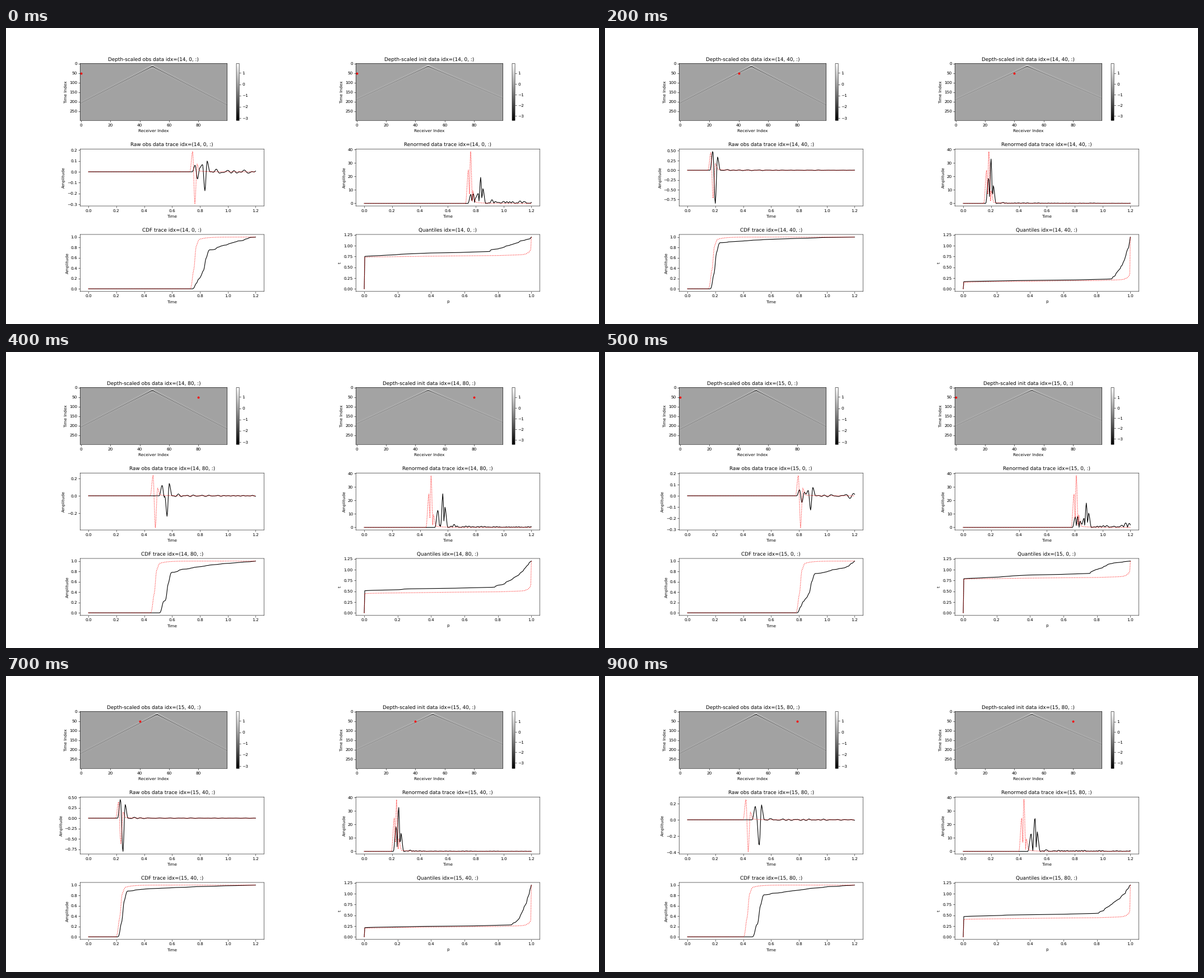
Recreate the animation shown at these times as a matplotlib script. Size 1058 by 529 pixels, loop 1 s.

```python
import numpy as np
import matplotlib.pyplot as plt
from matplotlib.animation import FuncAnimation

plt.rcParams.update({"path.snap": False, "text.hinting": "none"})

NT, NR, T_MAX = 300, 100, 1.2
t = np.linspace(0, T_MAX, NT + 1)
dt = t[1]
p = np.linspace(0, 1, NT)
FRAMES = [(shot, recv) for shot in (14, 15) for recv in range(0, NR, 20)]

INIT_WAVE = [(-.016, .64), (0, -1), (.016, .24)]
HEAD_WAVE = [(0, 1), (.017, -1.1), (.034, .6)]
RING = [(.060, -.015), (.085, .04), (.105, -.011)]


def swing(x, knots, lead=.02):
    """Smooth curve that rests at every extremum and is zero outside."""
    kt, kv = np.array(knots).T
    kt = np.concatenate([[kt[0] - lead], kt, [kt[-1] + lead]])
    kv = np.concatenate([[0], kv, [0]])
    i = np.clip(np.searchsorted(kt, x) - 1, 0, len(kt) - 2)
    u = np.clip((x - kt[i]) / (kt[i + 1] - kt[i]), 0, 1)
    return kv[i] + (kv[i + 1] - kv[i]) * u * u * (3 - 2 * u)


def offset(shot, recv):
    """Signed distance from the shot, in receivers."""
    return recv - (48.6 + 3.1 * (shot - 14))


def init_time(off):
    return .061 + np.where(off < 0, .0145, .0133) * np.abs(off)


def obs_time(off):
    return .0635 + np.where(off < 0, .0159, .0160) * np.abs(off)


def snap(time):
    return np.round(time / dt) * dt


def init_trace(off):
    tau = t - snap(init_time(off))
    tail = .024 * np.exp(-np.clip(tau - .03, 0, None) / .05) * (tau > .03)
    return 2.2 * abs(off) ** -.52 * (swing(tau, INIT_WAVE) + tail)


def coda(tau, rng):
    waves = sum(rng.uniform(.4, 1) * np.sin(2 * np.pi * f * tau + rng.uniform(0, 6))
                for f in rng.uniform(10, 30, 6))
    return waves * np.clip(tau / .04, 0, 1) * np.exp(-tau / .7)


def obs_trace(off, rng):
    """Main pulse, a head wave that pulls ahead with distance, and a coda."""
    d = abs(off)
    reach = 47 if off < 0 else 36
    tau = t - snap(obs_time(off))
    size = .55 * np.exp(-(d / reach) ** 4)
    gap = .018 + (d / 158) ** 2.5
    wave = [(-.017, .38), (0, -1), (.016, .25 + .0065 * d)]
    main = size * (swing(tau, wave) + swing(tau, RING))
    main += .4 * np.exp(-d / 26) * swing(tau + gap, HEAD_WAVE)
    noise = coda(np.clip(tau - .04, 0, None), rng)
    share = .09 + .13 * (d / reach) ** 2
    ratio = np.abs(main).sum() / np.abs(noise).sum()
    return main + noise * ratio * share / (1 - share)


def renorm(d):
    return np.abs(d) / (np.abs(d).sum() * dt)


def cdf(d):
    a = np.abs(d)
    c = np.concatenate([[0], np.cumsum(a[1:] + a[:-1])])
    return c / c[-1]


def quantile(c):
    q = np.interp(p, c, t)
    q[0] = 0
    return q


def gather(off, arrival, size, knee, knots):
    tau = np.arange(NT)[:, None] * dt - arrival(off)
    return size / np.sqrt(1 + np.abs(off) / knee) * swing(tau, knots)


fig, axes = plt.subplots(3, 2, figsize=(20, 10), dpi=52.9)
fig.subplots_adjust(left=.125, right=.9, bottom=.11, top=.88,
                    wspace=.5, hspace=.5)

images, stars = [], []
for ax in axes[0]:
    im = ax.imshow(np.zeros((NT, NR)), cmap="gray", aspect="auto",
                   vmin=-3.22, vmax=1.84)
    fig.colorbar(im, ax=ax)
    images.append(im)
    stars.append(ax.plot([0], [50], "r*")[0])
    ax.set(ylabel="Time Index", xlim=(-.5, NR - .5), ylim=(NT - .5, -.5))
    ax.set_xlabel("Receiver Index", labelpad=5)

plots = list(axes[1:].flat)
pairs = []
for ax in plots:
    black, = ax.plot([], [], "k-")
    red, = ax.plot([], [], "r:")
    pairs.append((black, red))
    ax.set_xlabel("Time", labelpad=5)
    ax.set_ylabel("Amplitude")
plots[3].set(xlabel="p", ylabel="t")

TITLES = ["Depth-scaled obs data", "Depth-scaled init data",
          "Raw obs data trace", "Renormed data trace",
          "CDF trace", "Quantiles"]


def update(k):
    shot, recv = FRAMES[k]
    offs = offset(shot, np.arange(NR))
    images[0].set_data(gather(offs, obs_time, 3.9, .7,
                              [(-.018, .55), (0, -1), (.017, .32)]))
    images[1].set_data(gather(offs, init_time, 4.1, .45, INIT_WAVE))
    gain = 1 + .045 * (shot - 14)
    images[1].set_clim(-3.42 * gain, 1.90 * gain)
    for star in stars:
        star.set_data([recv], [50])

    off = offset(shot, recv)
    obs = obs_trace(off, np.random.default_rng(100 * shot + recv))
    ini = init_trace(off)
    c_obs, c_ini = cdf(obs), cdf(ini)
    curves = [
        (t, obs, ini),
        (t, renorm(obs), renorm(ini)),
        (t, c_obs, c_ini),
        (p, quantile(c_obs), quantile(c_ini)),
    ]
    for ax, (black, red), (x, a, b) in zip(plots, pairs, curves):
        black.set_data(x, a)
        red.set_data(x, b)
        ax.relim()
        ax.autoscale_view()

    for ax, title in zip(axes.flat, TITLES):
        ax.set_title(f"{title} idx=({shot}, {recv}, :)")
    return []


anim = FuncAnimation(fig, update, frames=len(FRAMES), interval=100, repeat=True)
plt.show()
```
